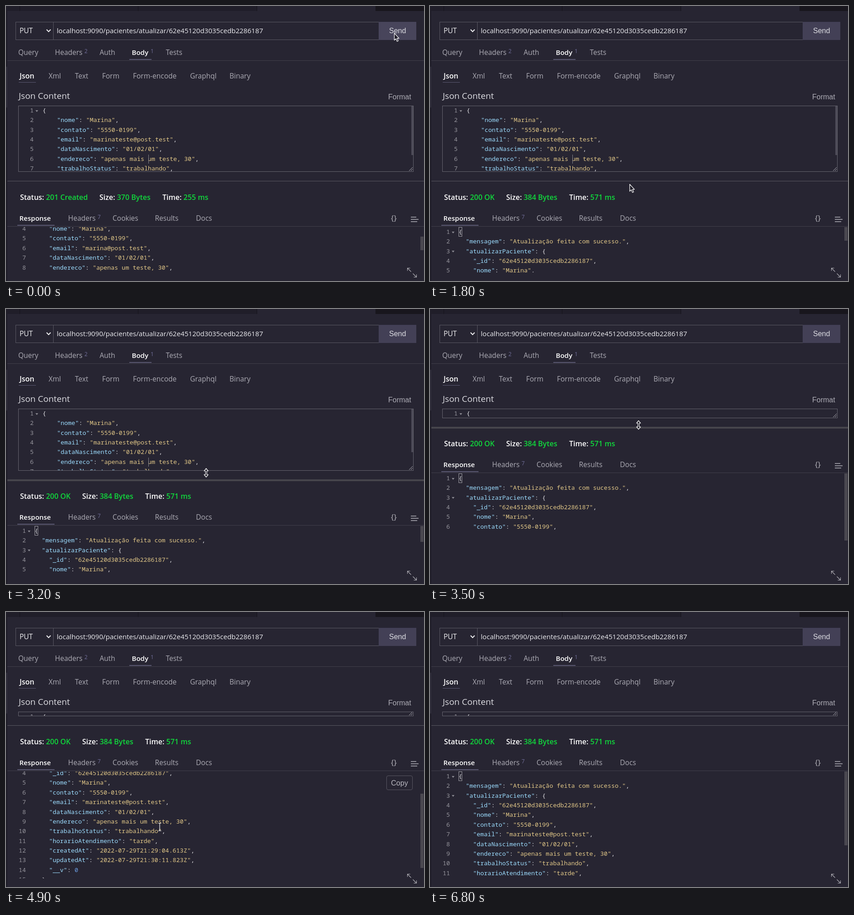
Recreate the animation shown at these times as an HTML page. Size 922x607 px, loop 7.6 s.

```html
<!DOCTYPE html>
<html lang="pt">
<head>
<meta charset="utf-8">
<title>REST client</title>
<style>
  html, body { margin: 0; height: 100%; overflow: hidden; background: #272532; }

  /* d: divider y, s: response scroll, x/y/k: pointer place and kind */
  .stage {
    position: relative; width: 922px; height: 607px; overflow: hidden;
    background: #272532; color: #adacb5;
    font: 15.5px/20px "Open Sans", "Noto Sans", sans-serif;
    animation: loop 7.6s step-end infinite;
  }
  .stage * { box-sizing: border-box; }
  .stage div, .stage span.t, .stage svg { position: absolute; }

  @keyframes loop {
    0%     { --d: 387; --s: 71.5; --x: 856; --y: 59.5; --k: 0; --hot: 1; --new: 0; --bar: 0; --rows: 6; --copy: 0; }
    6.57%  { --hot: 0; --y: 59; }
    9.21%  { --x: 846; --y: 74; }
    10.52% { --x: 812; --y: 120; }
    11.84% { --x: 748; --y: 196; }
    13.15% { --x: 668; --y: 284; }
    14.47% { --x: 582; --y: 360; --new: 1; --s: 0; }
    15.78% { --x: 512; --y: 424; }
    17.1%  { --x: 462; --y: 466; }
    18.42% { --x: 442; --y: 480; }
    21.05% { --x: 442; --y: 462; }
    22.36% { --x: 441; --y: 425; }
    23.68% { --x: 440; --y: 393; }
    25%    { --bar: 1; }
    27.63% { --x: 447; --y: 380; }
    30.26% { --x: 446; --y: 381; --k: 1; }
    31.57% { --x: 447; --y: 388; --k: 0; }
    35.52% { --x: 447; --y: 383; --k: 1; }
    36.84% { --y: 384; }
    42.1%  { --x: 441.5; --y: 361.5; --d: 378; }
    43.42% { --x: 452; --y: 287; --d: 300; }
    46.05% { --x: 460; --y: 256; --d: 262; }
    47.36% { --x: 462; --y: 249; --d: 251; }
    48.68% { --y: 248; }
    51.31% { --x: 460; --y: 262; --bar: 0; --rows: 16; }
    52.63% { --x: 445; --y: 300; --k: 0; }
    53.94% { --x: 400; --y: 380; --k: 2; --copy: 1; }
    55.26% { --x: 355; --y: 440; }
    56.57% { --x: 339; --y: 470; }
    64.47% { --x: 339; --y: 474.5; --s: 71.5; }
    65.78% { --x: 337; --y: 478; --s: 92; }
    67.1%  { --x: 335; --y: 481; --s: 103; }
    68.42% { --s: 107; }
    73.68% { --y: 482; }
    76.31% { --x: 332; --y: 486; }
    84.21% { --x: 345; --y: 470; --s: 80; }
    85.52% { --x: 380; --y: 430; --s: 25; }
    86.84% { --x: 470; --y: 370; --s: 0; }
    88.15% { --x: 760; --y: 140; --k: 0; --copy: 0; }
    89.47% { --k: 3; }
  }

  /* boxes and labels take left, top (labels: middle), width, height */
  .r { left: calc(var(--l) * 1px); top: calc(var(--t) * 1px); width: calc(var(--w) * 1px); height: calc(var(--h) * 1px); background: var(--c); }
  .t { left: calc(var(--l) * 1px); top: calc(var(--m) * 1px - 10px); white-space: pre; }
  .on { color: #fff; font-weight: 600; font-size: 15px; }
  .sup { font-size: 12px; color: #726f9b; }
  .ui { font: 16px/20px "Liberation Sans", Arial, sans-serif; }
  .field { border: 1px solid #5a5964; }
  .status { color: #fff; font-weight: 600; font-size: 16px; }
  .status i { color: #10d93c; font-style: normal; }

  .code { font: 13.37px/21.37px "Noto Sans Mono", "DejaVu Sans Mono", monospace; color: #e2e2e6; }
  .row { left: 0; top: calc(var(--i) * 21.37px); width: 100%; height: 21.37px; white-space: pre; }
  .row .n { position: absolute; right: calc(100% - var(--num)); color: #95949c; }
  .row .src { position: absolute; left: var(--src); }
  .row .fold { left: calc(var(--num) + 4px); top: 9.5px; border: 3.5px solid transparent; border-top: 4px solid #8b8a92; border-bottom: 0; }
  .key { color: #9cdcfe; }
  .str { color: #e2c888; }
  .num { color: #6ca0e6; }
  .pair { outline: 1px solid #a09fa6; outline-offset: -1px; }
  .caret { width: 1px; height: 20px; background: #85848c; }

  .editor {
    --num: 33px; --src: 52.5px; --eh: calc(var(--d) - 241.5);
    left: 27px; top: 220px; width: 872px; height: calc(var(--eh) * 1px);
    border: 1px solid #66656f; overflow: hidden;
  }
  .editor .thumb { right: 0; top: 0; width: 4px; height: calc(var(--eh) * var(--eh) / 196 * 1px); background: #4c4a57; opacity: calc(var(--eh) - 21); }
  .editor svg { right: 1px; bottom: 1px; }

  .line { left: 3px; right: 0; top: calc(var(--d) * 1px - 1px); height: 1px; background: #5a5962; }
  .bar { left: 3px; right: 0; top: calc(var(--d) * 1px - 2px); height: 4px; background: #46454c; opacity: var(--bar); }
  .panel { left: 0; top: calc(var(--d) * 1px); width: 922px; height: 500px; }
  .old { opacity: calc(1 - var(--new)); }
  .new { opacity: var(--new); }
  .view {
    --num: 44px; --src: 63px; --vh: calc(488 - var(--d));
    left: 0; top: 101px; width: 922px; height: calc(var(--vh) * 1px - 1px); overflow: hidden;
  }
  .rows { left: 0; top: 0; width: 900px; height: calc(var(--rows) * 21.37px); overflow: hidden; transform: translateY(calc(var(--s) * -1px)); }
  .rows.old { height: 200px; }
  .view .thumb {
    left: 914px; width: 7px; background: #4a4850;
    top: calc(var(--s) * var(--vh) / 344 * 1px);
    height: calc(var(--vh) * var(--vh) / 344 * 1px);
  }
  .copy { left: 839px; top: 110px; width: 58px; height: 32px; border: 1px solid #595763; border-radius: 4px; background: #272532; text-align: center; opacity: var(--copy); color: #b9b8c0; }

  .pointer { left: 0; top: 0; overflow: visible; transform: translate(calc(var(--x) * 1px), calc(var(--y) * 1px)); }
  .pointer path { opacity: calc(1 - max(var(--k) - var(--id), var(--id) - var(--k))); fill: #211f2a; stroke: #fff; stroke-width: 1.2; stroke-linejoin: round; }
  .ico { fill: none; stroke: #b4b3ba; stroke-width: 1.4; }
</style>
</head>
<body>
<div class="stage">
  <!-- window edges -->
  <div class="r" style="--l:0;--t:0;--w:554;--h:11;--c:#201e29"></div>
  <div class="r" style="--l:815;--t:0;--w:107;--h:11;--c:#18161d"></div>
  <div class="r" style="--l:30;--t:0;--w:1;--h:11;--c:#15131b"></div>
  <div class="r" style="--l:291;--t:0;--w:1;--h:11;--c:#15131b"></div>
  <div class="r" style="--l:553;--t:0;--w:1;--h:11;--c:#15131b"></div>
  <div class="r" style="--l:0;--t:11;--w:3;--h:596;--c:#201e29"></div>
  <div class="r" style="--l:0;--t:134;--w:3;--h:90;--c:#2e2c39"></div>

  <!-- request -->
  <div class="r field" style="--l:21;--t:35;--w:884;--h:40"></div>
  <div class="r" style="--l:104;--t:35;--w:1;--h:40;--c:#5a5964"></div>
  <span class="t" style="--l:30;--m:54;color:#f0f0f2">PUT</span>
  <svg class="ico" style="left:88px;top:50px;stroke:#f0f0f2;stroke-width:2" width="12" height="10"><path d="M1.5 2 6 6.5 10.5 2"/></svg>
  <span class="t" style="--l:112;--m:54;color:#ececf0;font-size:15.15px">localhost:9090/pacientes/atualizar/62e45120d3035cedb2286187</span>
  <div class="r" style="--l:822;--t:35;--w:83;--h:40;--c:#434056"></div>
  <div class="r" style="--l:822;--t:35;--w:83;--h:40;--c:#48455b;opacity:var(--hot)"></div>
  <span class="t ui" style="--l:845;--m:54.5;color:#dcdce2">Send</span>

  <span class="t" style="--l:27;--m:102">Query</span>
  <span class="t" style="--l:108;--m:102">Headers</span><span class="t sup" style="--l:173;--m:99.5">2</span>
  <span class="t" style="--l:206.5;--m:102">Auth</span>
  <span class="t on" style="--l:277.5;--m:102">Body</span><span class="t sup" style="--l:319;--m:99.5">1</span>
  <span class="t" style="--l:352.5;--m:102">Tests</span>
  <div class="r" style="--l:3;--t:120;--w:919;--h:1;--c:#413f4b"></div>
  <div class="r" style="--l:272;--t:117;--w:49;--h:2;--c:#5b5972"></div>

  <span class="t on" style="--l:30;--m:153.5;font-size:16px">Json</span>
  <span class="t" style="--l:94;--m:153.5">Xml</span>
  <span class="t" style="--l:152;--m:153.5">Text</span>
  <span class="t" style="--l:212;--m:153.5">Form</span>
  <span class="t" style="--l:280;--m:153.5">Form-encode</span>
  <span class="t" style="--l:406;--m:153.5">Graphql</span>
  <span class="t" style="--l:493;--m:153.5">Binary</span>
  <div class="r" style="--l:28;--t:168;--w:38;--h:1;--c:#5b5972"></div>

  <span class="t" style="--l:28;--m:198;color:#dddde2;font-size:19px">Json Content</span>
  <span class="t ui" style="--l:843;--m:201">Format</span>

  <div class="editor code">
    <div id="body" style="inset:-1px 0 auto 0"></div>
    <div class="caret" style="left:286px;top:107px"></div>
    <div class="thumb"></div>
    <svg class="ico" width="8" height="8" style="stroke-width:1"><path d="M0 8 8 0M4 8 8 4"/></svg>
  </div>

  <!-- response -->
  <div class="line"></div>
  <div class="bar"></div>
  <div class="panel">
    <div class="old">
      <span class="t status" style="--l:31;--m:35">Status: <i>201 Created</i></span>
      <span class="t status" style="--l:206;--m:35">Size: <i>370 Bytes</i></span>
      <span class="t status" style="--l:345;--m:35">Time: <i>255 ms</i></span>
    </div>
    <div class="new">
      <span class="t status" style="--l:31;--m:35">Status: <i>200 OK</i></span>
      <span class="t status" style="--l:168;--m:35">Size: <i>384 Bytes</i></span>
      <span class="t status" style="--l:307;--m:35">Time: <i>571 ms</i></span>
    </div>
    <span class="t on" style="--l:29.5;--m:81">Response</span>
    <span class="t" style="--l:137;--m:81">Headers</span><span class="t sup" style="--l:202;--m:78.5">7</span>
    <span class="t" style="--l:235;--m:81">Cookies</span>
    <span class="t" style="--l:328.5;--m:81">Results</span>
    <span class="t" style="--l:419;--m:81">Docs</span>
    <span class="t" style="--l:849;--m:81;font-size:17px;color:#b4b3ba">{}</span>
    <svg class="ico" style="left:893px;top:77px" width="18" height="14"><path d="M0 2H12M0 7H17M0 12H14"/></svg>
    <div class="r" style="--l:3;--t:99;--w:919;--h:1;--c:#413f4b"></div>
    <div class="r" style="--l:25;--t:96;--w:82;--h:2;--c:#5b5972"></div>
    <div class="view code">
      <div class="rows old" id="before"></div>
      <div class="rows new" id="after"></div>
      <div class="thumb"></div>
    </div>
    <div class="copy ui" style="line-height:31px">Copy</div>
  </div>

  <svg class="ico" style="left:884px;top:577px;stroke-width:1.1" width="23" height="23"><path d="M1.5 7.5V1.5H7.5M1.5 1.5 9.5 9.5M21.5 15.5V21.5H15.5M21.5 21.5 13.5 13.5"/></svg>

  <svg class="pointer" width="1" height="1">
    <path style="--id:0" d="M.5 .5V16L4 12.8 6.6 18.7 9.2 17.5 6.6 11.8H11Z"/>
    <path style="--id:1" d="M0-9.5 4.5-4H1.5V4H4.5L0 9.5-4.5 4H-1.5V-4H-4.5Z"/>
    <path style="--id:2;fill:none" d="M-3.5-8.5H-1L0-7.5 1-8.5H3.5M0-7.5V7.5M-3.5 8.5H-1L0 7.5 1 8.5H3.5"/>
  </svg>
</div>
<script>
  const patient = [
    '"nome": "Marina",',
    '"contato": "5550-0199",',
    '"email": "marinateste@post.test",',
    '"dataNascimento": "01/02/01",',
    '"endereco": "apenas mais um teste, 30",',
    '"trabalhoStatus": "trabalhando",',
    '"horarioAtendimento": "tarde",'
  ];
  const indent = lines => lines.map(line => '    ' + line);

  const paint = line => line.replace(/("[^"]*")(:?)|\b\d+\b/g, (all, text, colon) =>
    text ? `<span class="${colon ? 'key' : 'str'}">${text}</span>${colon}`
         : `<span class="num">${all}</span>`);

  function fill(id, lines, first = 1) {
    document.getElementById(id).innerHTML = lines.map((line, i) => {
      const fold = line.endsWith('{') ? '<div class="fold"></div>' : '';
      return `<div class="row" style="--i:${first + i - 1}"><span class="n">${first + i}</span>` +
        `${fold}<span class="src">${paint(line)}</span></div>`;
    }).join('');
  }

  fill('body', ['{', ...indent(patient.slice(0, 6))]);

  const earlier = patient.slice(0, 5);
  earlier[2] = '"email": "marina@post.test",';
  earlier[4] = '"endereco": "apenas um teste, 30",';
  fill('before', indent(earlier), 4);

  fill('after', [
    '{',
    '  "mensagem": "Atualização feita com sucesso.",',
    '  "atualizarPaciente": {',
    ...indent([
      '"_id": "62e45120d3035cedb2286187",',
      ...patient,
      '"createdAt": "2022-07-29T21:29:04.613Z",',
      '"updatedAt": "2022-07-29T21:30:11.823Z",',
      '"__v": 0'
    ]),
    '  }',
    '}'
  ]);

  // matching outer brackets, with the caret after the last one
  const rows = document.querySelectorAll('#after .row');
  for (const row of [rows[0], rows[15]]) row.querySelector('.src').classList.add('pair');
  rows[15].insertAdjacentHTML('beforeend', '<div class="caret" style="left:72px;top:1px"></div>');
</script>
</body>
</html>
```
